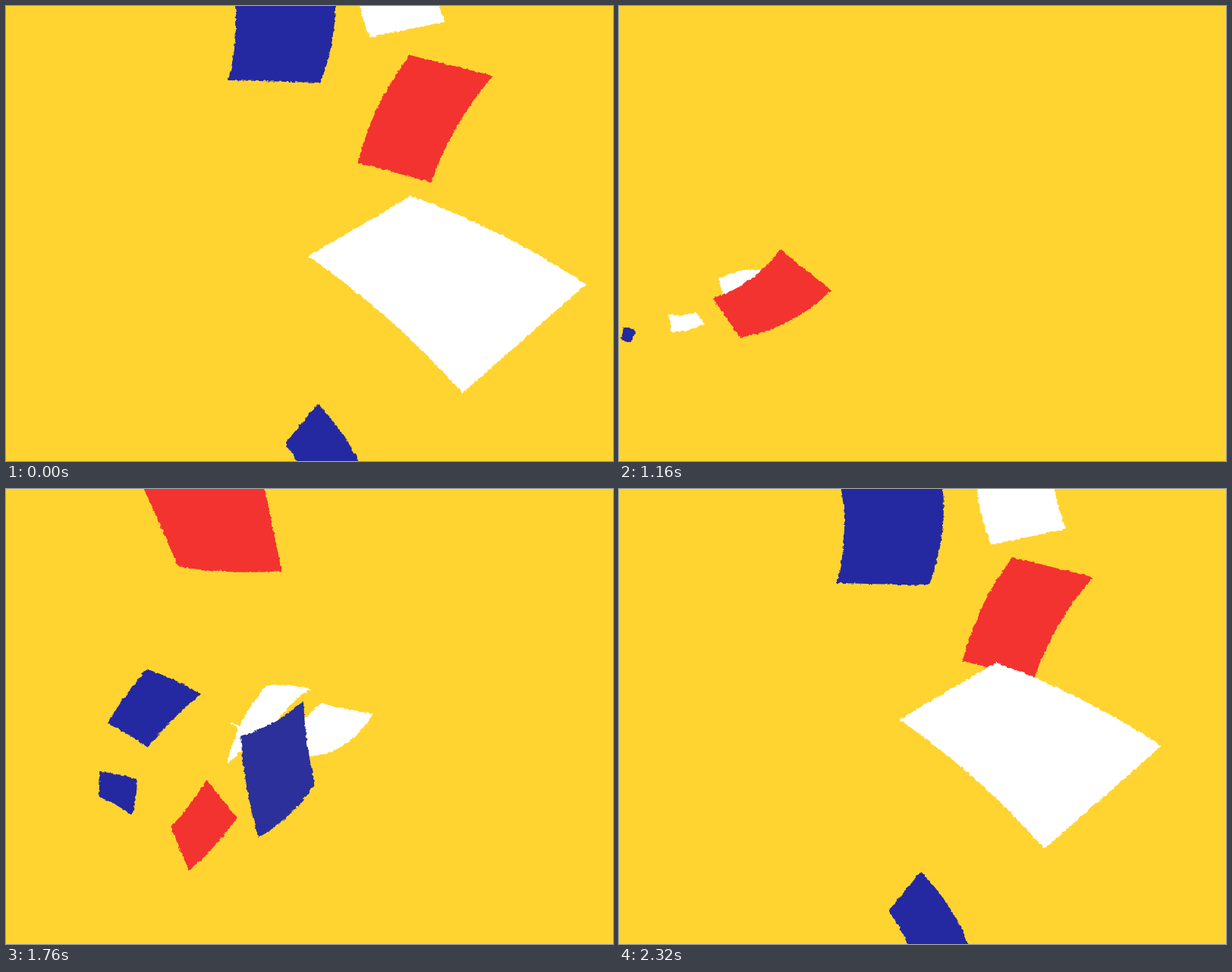
An HTML page for the animation above (2360 ms loop, 800 by 600 pixels).

```html
<!DOCTYPE html>
<html lang="en">
<head>
<meta charset="utf-8">
<title>Flying paper</title>
<style>
  html, body { margin: 0; width: 100%; height: 100%; overflow: hidden; background: #ffd430; }
  svg { display: block; width: 100vw; height: 100vh; }
</style>
</head>
<body>
<svg viewBox="0 0 800 600">
  <defs>
    <filter id="rough" filterUnits="userSpaceOnUse" x="-20" y="-20" width="840" height="640" color-interpolation-filters="sRGB">
      <feTurbulence type="fractalNoise" baseFrequency="0.2" numOctaves="2" seed="4"/>
      <feDisplacementMap in="SourceGraphic" scale="4.5" xChannelSelector="R" yChannelSelector="G"/>
    </filter>
  </defs>
  <rect width="800" height="600" fill="#ffd430"/>
  <g id="stage" filter="url(#rough)" stroke-width="2" stroke-linejoin="round"></g>
</svg>
<script>
const LOOP = 2360, STEP = 40, FIRST = 840;
const RED = '#f33330', BLUE = '#2429a2', INDIGO = '#2c309a', WHITE = '#fff';

// A pose is four clockwise corners and two bends, each a share of the edge length.
// bend curves the second and fourth edge, cross the first and third.
const pose = (t, corners, bend = 0, cross = 0) => ({ t, v: [...corners, bend, cross] });

// Every sheet enters as a speck at the left border.
const launch = (t, y = 435, x = -4, r = 5) =>
  pose(t, [x - r, y - r, x + r, y - r, x + r, y + r, x - r, y + r], 0.1);

const sliver = (t, x1, y1, x2, y2) => pose(t, [x1, y1, x2, y2, x2, y2, x1, y1]);

// The pose followed by the same one a step later, moved and grown about its centre.
function leave(p, dx, dy, grow = 1) {
  const middle = axis => (p.v[axis] + p.v[axis + 2] + p.v[axis + 4] + p.v[axis + 6]) / 4;
  const centre = [middle(0), middle(1)], shift = [dx, dy];
  const v = p.v.map((n, i) => i > 7 ? n : centre[i % 2] + shift[i % 2] + (n - centre[i % 2]) * grow);
  return [p, { t: p.t + STEP, v }];
}

const tallBlue = [
  launch(1120),
  pose(1520, [138, 364, 187, 396, 131, 454, 104, 418], 0.1),
  pose(1960, [217, 121, 306, 146, 240, 231, 165, 211], -0.1, 0.04),
  ...leave(pose(2320, [280, -50, 417, -50, 408, 126, 288, 123], 0.08), 6, -26),
];

const lowBlue = [
  launch(1440, 402),
  pose(1960, [212, 379, 279, 408, 262, 463, 205, 421], 0, 0.05),
  ...leave(pose(2320, [398, 506, 475, 650, 395, 650, 356, 557], 0, 0.07), 13, 20),
];

const smallWhite = [
  launch(1000, 430),
  pose(1520, [227, 362, 309, 350, 351, 370, 242, 403], 0, -0.19),
  pose(1960, [354, 247, 473, 199, 560, 205, 445, 271], 0, -0.14),
  ...leave(pose(2320, [491, 72, 478, -70, 575, -70, 588, 52], 0, 0.08), -11, -32),
];

// Turns over on its way out, so its white back shows at the end.
const turningRed = [
  launch(1360),
  pose(1520, [69, 416, 119, 429, 112, 473, 63, 445]),
  pose(1960, [411, 333, 445, 401, 347, 488, 337, 421], 0.05),
  ...leave(pose(2320, [519, 91, 623, 117, 546, 250, 454, 226], -0.05), 14, -22, 1.04),
  ...leave(pose(2680, [777, 54, 666, 56, 772, 186, 865, 190], 0.03), 14, -8),
];

const largeWhite = [
  launch(920),
  pose(1160, [139, 383, 132, 360, 187, 349, 195, 385], 0.08),
  pose(1520, [362, 442, 366, 351, 463, 376, 395, 451], 0.04),
  pose(1960, [231, 291, 322, 194, 365, 191, 327, 227], 0.05, 0.1),
  ...leave(pose(2320, [371, 304, 497, 230, 713, 339, 561, 473], 0.03), 39, 28, 1.06),
];

const indigoFace = [
  sliver(1280, 278, 360, 260, 408),
  pose(1520, [404, 370, 465, 382, 450, 490, 385, 484], 0, -0.16),
  pose(1960, [231, 291, 327, 227, 363, 307, 282, 404], -0.04, 0.04),
  sliver(2180, 317, 299, 470, 377),
];

const largeRed = [
  launch(840),
  pose(1160, [213, 322, 278, 375, 160, 436, 125, 386], 0.08),
  pose(1520, [264, 32, 430, 24, 443, 173, 313, 163], 0.12),
  ...leave(pose(1960, [70, -60, 215, -70, 247, 69, 120, 62], -0.12, -0.06), -6, -25),
];

// Position through unevenly timed poses; past the last one the sheet speeds away.
function sample(poses, t) {
  const last = poses.length - 1;
  if (t < poses[0].t) return null;
  if (t >= poses[last].t) {
    const a = poses[last - 1], b = poses[last];
    if (b.t - a.t > STEP) return null;
    const n = (t - b.t) / STEP, reach = n * (1 + 0.1 * n);
    return b.v.map((to, j) => to + (to - a.v[j]) * reach);
  }
  const i = poses.findIndex((p, n) => n < last && t < poses[n + 1].t);
  const a = poses[i], b = poses[i + 1], span = b.t - a.t, u = (t - a.t) / span;
  const slope = (n, j) => {
    const p = poses[Math.max(n - 1, 0)], q = poses[Math.min(n + 1, last)];
    return (q.v[j] - p.v[j]) / (q.t - p.t) * span;
  };
  return a.v.map((from, j) => {
    const delta = b.v[j] - from, m = slope(i, j), n = slope(i + 1, j);
    return from + u * (m + u * (3 * delta - 2 * m - n + u * (m + n - 2 * delta)));
  });
}

// A curled edge: opens and closes around its peak, hanging on corners of another sheet.
const flap = (poses, anchors, reach, peak, cross = 0) => t => {
  const open = Math.cos(Math.min(1, Math.abs(t - peak) / 160) * Math.PI / 2);
  const v = sample(poses, t);
  if (!v || open < 0.01) return null;
  return [...reach.map((r, i) => v[2 * anchors[i >> 1] + i % 2] + r * open), 0, cross * open];
};
const flight = poses => t => sample(poses, t);

function sheet(shape, front, back = front) {
  const path = document.createElementNS('http://www.w3.org/2000/svg', 'path');
  document.getElementById('stage').append(path);
  return { shape, front, back, path };
}
const sheets = [
  sheet(flap(tallBlue, [1, 1, 1, 1], [-14, 5, -2, -2, 11, 9, -4, 8], 1960), RED),
  sheet(flight(tallBlue), BLUE),
  sheet(flight(lowBlue), BLUE),
  sheet(flight(smallWhite), WHITE),
  sheet(flight(turningRed), RED, WHITE),
  sheet(flight(largeWhite), WHITE),
  sheet(flight(indigoFace), INDIGO),
  sheet(flight(largeRed), RED),
  sheet(flap(largeRed, [0, 1, 1, 0], [-14, -4, -3, -2, -47, 14, 0, 0], 1520, 0.06), WHITE),
];

function outline(v) {
  let d = `M${v[0]} ${v[1]}`, area = 0;
  for (let i = 0; i < 4; i++) {
    const j = (i + 1) % 4;
    const x = v[2 * i], y = v[2 * i + 1], x2 = v[2 * j], y2 = v[2 * j + 1];
    const push = 2 * (i % 2 ? v[8] : v[9]) * (i === 0 || i === 1 ? 1 : -1);
    d += `Q${(x + x2) / 2 + (y2 - y) * push} ${(y + y2) / 2 - (x2 - x) * push} ${x2} ${y2}`;
    area += x * y2 - x2 * y;
  }
  return { d: d + 'Z', area };
}

function draw(ms) {
  let t = Math.floor((ms % LOOP) / STEP) * STEP;
  if (t < FIRST) t += LOOP;
  for (const { shape, front, back, path } of sheets) {
    const v = shape(t);
    path.style.display = v ? '' : 'none';
    if (!v) continue;
    const { d, area } = outline(v);
    const color = area >= 0 ? front : back;
    path.setAttribute('d', d);
    path.setAttribute('fill', color);
    path.setAttribute('stroke', color);
  }
}

const start = performance.now();
function tick() {
  draw(performance.now() - start);
  requestAnimationFrame(tick);
}
tick();
</script>
</body>
</html>
```
